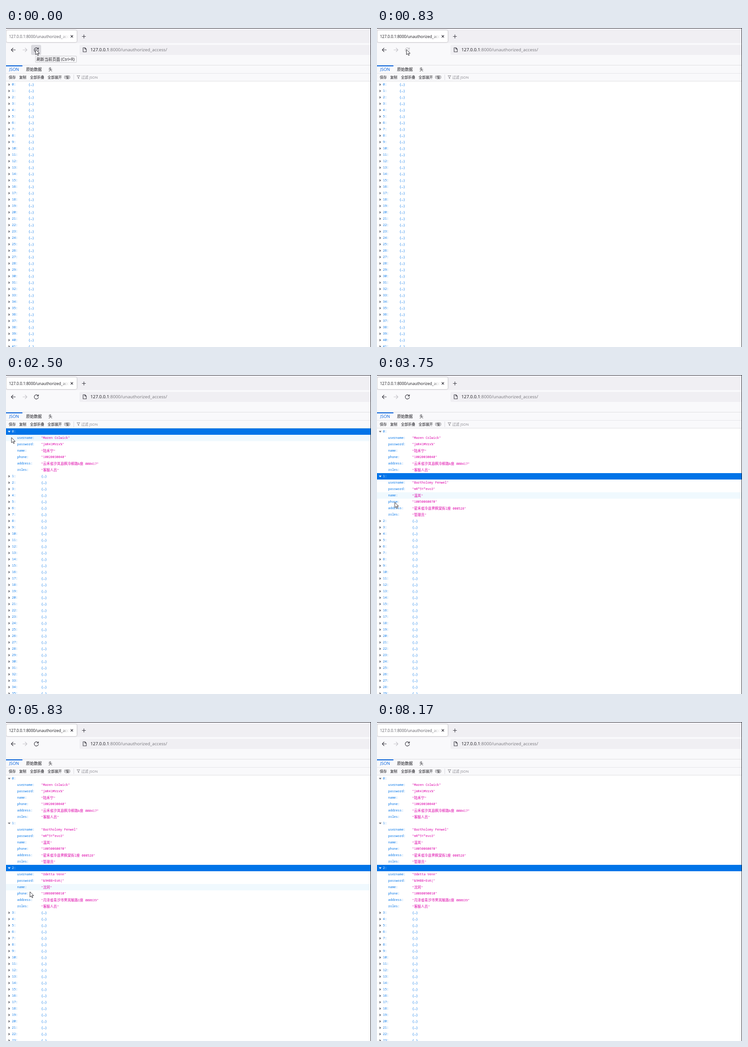
These frames come from a looping animation (800x699 px, 8.58 s). An HTML page:

```html
<!DOCTYPE html>
<html lang="zh-CN">
<head>
<meta charset="utf-8">
<title>JSON</title>
<style>
html, body { margin: 0; width: 100%; height: 100%; overflow: hidden; background: #fff; }
#stage { position: absolute; left: 0; top: 0; width: 800px; height: 699px; overflow: hidden; background: #fff;
  font-family: 'Open Sans', 'Noto Sans', 'Noto Sans CJK SC', sans-serif; color: #15141a; }
#stage div, #stage svg { position: absolute; }
.t { white-space: pre; line-height: 14px; height: 14px; }
#tabs { left: 0; top: 0; width: 800px; height: 33px; background: #f0eff3; }
#tab { left: 1px; top: 5px; width: 154px; height: 26px; border-radius: 3px; background: #fff; box-shadow: 0 0 3px rgba(0,0,0,.35); }
#title { left: 6.5px; top: 11.5px; width: 132px; overflow: hidden; font-size: 8.5px;
  -webkit-mask-image: linear-gradient(90deg, #000 112px, transparent 132px); mask-image: linear-gradient(90deg, #000 112px, transparent 132px); }
#nav { left: 0; top: 33px; width: 800px; height: 49px; background: #f9f9fb; }
#url { left: 161px; top: 37px; width: 640px; height: 22px; border-radius: 3px; background: #f0eff3; }
#addr { left: 185px; top: 40.5px; font-size: 9.75px; color: #77767c; }
#addr b { font-weight: 400; color: #15141a; }
#hot { left: 55px; top: 37px; width: 22px; height: 22px; border-radius: 3px; background: #dadadf; }
#tip { left: 64px; top: 61px; width: 89px; height: 13px; border: 1px solid #c9c9cd; border-radius: 2px; background: #f9f9fb; }
#tip .t { left: 2px; top: -.5px; font-size: 8.6px; }
#bar1 { left: 0; top: 81px; width: 800px; height: 17px; background: #f9f9fb; border-top: 1px solid #e0e0e2; }
#bar2 { left: 0; top: 99px; width: 800px; height: 17px; background: #f9f9fb; border-bottom: 1px solid #e0e0e2; border-top: 1px solid #e6e6e9; box-sizing: border-box; height: 18px; }
#mark { left: 0; top: 82px; width: 36px; height: 1.5px; background: #0061e0; }
.big { top: 84px; font-size: 8.6px; }
.small { top: 101px; font-size: 7.85px; }
#sep { left: 148px; top: 102px; width: 1px; height: 12px; background: #dcdce0; }
#list { left: 0; top: 117px; width: 799px; height: 582px; overflow: hidden;
  font: 7px/14px 'Noto Sans Mono', 'Liberation Mono', 'Noto Sans CJK SC', monospace; color: #0074e8; }
.row { left: 0; width: 799px; height: 14px; }
.row i { font-style: normal; font-size: 7.65px; line-height: 14px; }
.row .str { color: #dd00a9; }
.row.over { background: #f0f9fe; }
.row.sel { background: #0074e8; color: #fff; }
.row svg { left: 3px; top: 3px; fill: #6f6f75; }
.row.sel svg { fill: #fff; }
.edge { background: #2b2a33; }
</style>
</head>
<body>
<div id="stage">
  <div id="tabs"></div>
  <div id="tab"></div>
  <div id="title" class="t">127.0.0.1:8000/unauthorized_access/</div>
  <div id="nav"></div>
  <div id="url"></div>
  <div id="hot"></div>
  <svg width="200" height="70" style="left:0;top:0" fill="none" stroke="#3a3942" stroke-width="1.1" stroke-linecap="round" stroke-linejoin="round">
    <path d="M142 16l4.6 4.6M146.600 16l-4.600 4.600M167 18.500h7.500M170.750 14.750v7.500"/>
    <path d="M20.500 48h-9m4-4l-4 4l4 4"/>
    <path d="M37 48h9m-4-4l4 4l-4 4" stroke="#c3c2c8"/>
    <path id="reload" d="M70.300 45.300a4.600 4.600 0 1 0 .8 3.500M71.200 43v3.100h-3.200"/>
    <path id="stop" d="M63 44.500l7 7M70 44.500l-7 7"/>
    <path d="M169 43.200h4l3 3v6h-7zM173 43.200v3h3"/>
  </svg>
  <div id="addr" class="t"><b>127.0.0.1</b>:8000/unauthorized_access/</div>
  <div id="bar1"></div>
  <div id="bar2"></div>
  <div id="mark"></div>
  <div class="t big" style="left:7px;color:#0061e0;font-size:9.1px">JSON</div>
  <div class="t big" style="left:44px">原始数据</div>
  <div class="t big" style="left:93px">头</div>
  <div class="t small" style="left:6px">保存</div>
  <div class="t small" style="left:29px">复制</div>
  <div class="t small" style="left:52.500px">全部折叠</div>
  <div class="t small" style="left:91px">全部展开（慢）</div>
  <div id="sep"></div>
  <svg width="10" height="10" style="left:154px;top:103px" fill="none" stroke="#85848b" stroke-width=".9"><path d="M1.500 1.500h6.500l-2.500 3v3.500l-1.500-1v-2.500z"/></svg>
  <div class="t small" style="left:165px;color:#85848b">过滤 JSON</div>
  <div id="list"></div>
  <div id="tip"><div class="t">刷新当前页面 (Ctrl+R)</div></div>
  <div class="edge" style="left:0;top:0;width:800px;height:1px"></div>
  <div class="edge" style="left:799px;top:0;width:1px;height:699px"></div>
  <svg id="cursor" width="12" height="17" style="left:-1px;top:-1px"><path d="M1 1v11.500l2.700-2.400l1.900 4.100l1.800-.8l-1.900-3.900h3.700z" fill="#fff" stroke="#1c1b22" stroke-width=".9"/></svg>
</div>
<script>
const LOOP = 8580, STEP = 1000 / 12, ROW = 14, TOP = 117;
const $ = id => document.getElementById(id);

const keys = ['username', 'password', 'name', 'phone', 'address', 'roles'];
const people = [
  ['Maren Colwick', 'jmR41MVrx%', '陆禾宁', '10020030040', '云禾省汐岚县枫泠柳路k座 000417', '客服人员'],
  ['Bartholomy Fenwel', 'mR*5Y*evo3', '温岚', '10050060070', '星禾省泠县霁枫棠街l座 000528', '管理员'],
  ['Odetta Venn', '&9HBB+EsK(', '沈珂', '10080090010', '月泽省青汐市霁岚榆路I座 000639', '客服人员']
];

// Clicks in the list: time, selected entry, number of open entries
const clicks = [[0, -1, 0], [2160, 0, 1], [3160, 1, 2], [4740, 4, 2], [5490, 2, 3]];

// Pointer path: time, x, y
const path = [
  [0, 65, 47], [750, 64.5, 47], [1170, 64.5, 47], [1580, 8, 121], [1750, 8, 121], [1920, 6, 123],
  [2170, 6, 123], [2330, 8, 131], [2500, 12, 137], [2920, 8, 221], [3330, 8, 222],
  [3500, 20, 238], [3667, 33, 264], [3750, 39, 279], [3840, 43, 293], [3920, 43, 293],
  [4080, 50, 312], [4250, 50, 312], [4670, 84.5, 343], [5080, 84.5, 343], [5420, 7, 320],
  [5580, 8, 322], [5750, 42, 357], [5833, 52.5, 372], [6000, 58, 385], [6330, 66, 436],
  [6500, 66, 436], [6830, 75, 238], [7330, 110, 672], [7420, 110, 672], [7920, 150, 725]
];

function pointer(t) {
  let i = 0;
  while (i < path.length - 2 && path[i + 1][0] < t) i++;
  const [a, x, y] = path[i], [b, u, v] = path[i + 1];
  const k = Math.max(0, Math.min(1, (t - a) / (b - a)));
  return [x + (u - x) * k, y + (v - y) * k];
}

const esc = s => s.replace(/&/g, '&amp;').replace(/[\u4e00-\u9fff]+/g, '<i>$&</i>');
const cell = (x, s, cls = '') => `<div class="t ${cls}" style="left:${x}px">${s}</div>`;
const arrow = open => `<svg width="9" height="9"><path d="${open ? 'M1 2.500h6l-3 3.500z' : 'M2.500 1v6l3.500-3z'}"/></svg>`;

function drawList(sel, open) {
  const col = open ? 77 : 49, rows = [];
  for (let n = 0; rows.length < 42; n++) {
    const isOpen = n < open;
    rows.push([n === sel, arrow(isOpen) + cell(13, n + ':') + (isOpen ? '' : cell(col, '{…}'))]);
    if (isOpen) keys.forEach((key, k) =>
      rows.push([false, cell(24.5, key + ':') + cell(col, `"${esc(people[n][k])}"`, 'str')]));
  }
  $('list').innerHTML = rows.map(([on, html], i) =>
    `<div class="row${on ? ' sel' : ''}" style="top:${i * ROW}px">${html}</div>`).join('');
}

const show = (id, on) => { $(id).style.visibility = on ? 'visible' : 'hidden'; };
let drawn = '';

function render(now) {
  const t = Math.floor((now + 5) / STEP) * STEP;
  const [, sel, open] = clicks.filter(c => c[0] <= t).pop();
  if (drawn !== sel + '/' + open) {
    drawn = sel + '/' + open;
    drawList(sel, open);
  }

  const [x, y] = pointer(t);
  $('cursor').style.transform = `translate(${x}px,${y}px)`;

  // The highlight trails the pointer by one step
  const over = Math.floor((pointer(Math.max(0, t - STEP))[1] - TOP) / ROW);
  [...$('list').children].forEach((row, i) =>
    row.classList.toggle('over', i === over && !row.classList.contains('sel')));

  const loading = t > 240 && t < 580;
  show('tip', t < 160);
  show('hot', t < 580);
  show('stop', loading);
  show('reload', !loading);
  show('list', t < 330 || t > 490);
  $('reload').style.opacity = t > 570 && t < 1240 ? .3 : 1;
  $('title').style.color = t < 160 || t > 8150 ? '#5b5a62' : '#15141a';
}

const start = performance.now();
function tick() {
  render((performance.now() - start) % LOOP);
  requestAnimationFrame(tick);
}
tick();
</script>
</body>
</html>
```
